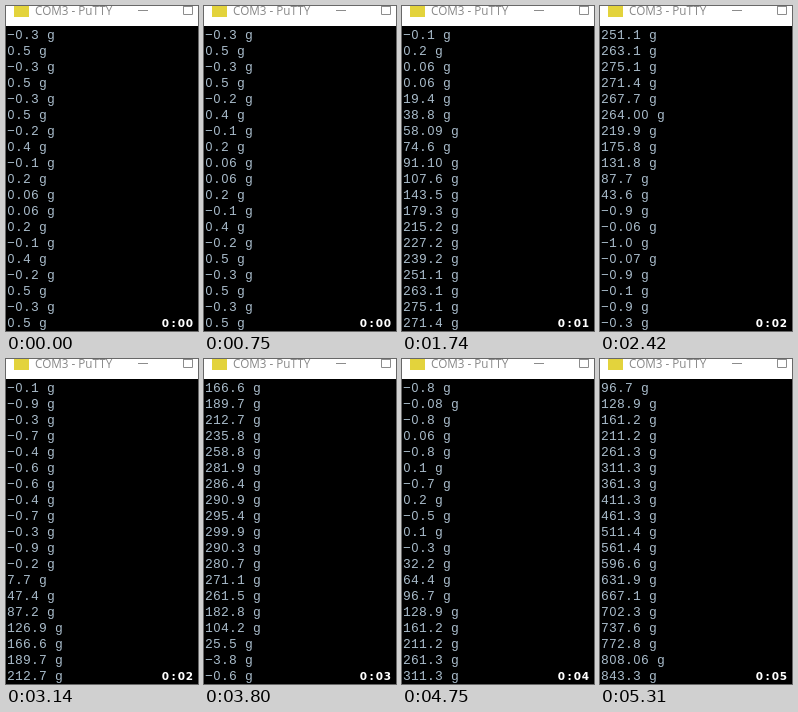
These frames come from a looping animation (192x325 px, 5410 ms). An HTML page:

```html
<!DOCTYPE html>
<html lang="en">
<head>
<meta charset="utf-8">
<title>Serial scale readout</title>
<style>
  html, body { margin: 0; width: 100%; height: 100%; overflow: hidden; background: #000; }
  svg { display: block; width: 192px; height: 325px; }
  .title { font: 11.7px "Open Sans", "Noto Sans", sans-serif; fill: #888; }
  .button { fill: none; stroke: #8c8c8c; }
  .cells { text-anchor: middle; }
  #rows { font: 13px "Liberation Mono", monospace; fill: #a9bccb; }
  #rows tspan { font: 12.3px "Liberation Sans", sans-serif; }
  #clock { font: bold 10.5px "DejaVu Sans", sans-serif; fill: #fff; }
</style>
</head>
<body>
<svg viewBox="0 0 192 325">
  <rect width="192" height="325"/>
  <rect width="192" height="20" fill="#fff"/>
  <rect x="8" y="-4" width="15" height="15" fill="#e3d33c"/>
  <text class="title" x="29" y="9">COM3 - PuTTY</text>
  <path class="button" d="M132 4.5h10M177.5 -1v9.5h9V-1M177.5 .5h9"/>
  <g id="rows" class="cells"></g>
  <text id="clock" class="cells" x="159.5 167.5 175.5 183.5" y="320.5">0:00</text>
</svg>
<script>
const LOOP = 5410, ROWS = 19, SECOND = 1048;

// Time in ms and rows scrolled by then
const scroll = [[0, 0], [750, 19], [1740, 42], [3140, 73], [3800, 89], [4750, 117], [5310, 130]];

// Row and load in grams: three presses, with rest between them
const load = [
  [0, 0.1], [45, 0.1], [48, 58.09], [51, 107.6], [54, 215.2], [59, 275.1], [62, 264], [68, -0.5],
  [84, -0.55], [85, 7.7], [89, 166.6], [94, 281.9], [98, 299.9], [102, 261.5], [105, 25.5],
  [106, -3.8], [107, -1], [117, -0.5], [127, -0.1], [132, 161.2], [140, 561.4], [148, 843.3],
];

function interpolate(points, x) {
  const next = points.findIndex(([px]) => px >= x);
  if (next < 0) return points[points.length - 1][1];
  if (next === 0) return points[0][1];
  const [x0, y0] = points[next - 1], [x1, y1] = points[next];
  return y0 + (y1 - y0) * (x - x0) / (x1 - x0);
}

// At rest the reading alternates with a slow beat
const hum = row => -0.45 * Math.cos(Math.PI * row) * Math.cos(Math.PI * (row - 2) / 17);

// Fractions below a tenth print with two decimals
function reading(row) {
  const level = interpolate(load, row);
  const grams = Math.abs(level) < 1.5 ? level + hum(row) : level;
  const digits = Math.abs(grams) % 1 < 0.1 ? 2 : 1;
  return grams.toFixed(digits).replace("-", "\u2212") + " g";
}

const cells = Array.from({ length: 10 }, (_, i) => 5 + 8 * i).join(" ");
const group = document.getElementById("rows");
const clock = document.getElementById("clock");
group.innerHTML = Array.from({ length: ROWS }, (_, i) =>
  `<text x="${cells}" y="${33 + 16 * i}"></text>`).join("");
const lines = [...group.children];

let shownRow = -1;
function draw(t) {
  clock.textContent = "0:0" + Math.floor(t / SECOND);
  const row = Math.floor(interpolate(scroll, t) + 0.05);
  if (row === shownRow) return;
  shownRow = row;
  lines.forEach((line, i) => {
    line.innerHTML = reading(row + i).replace(/0/g, "<tspan>0</tspan>");
  });
}

const start = performance.now();
function frame() {
  draw((performance.now() - start) % LOOP);
  requestAnimationFrame(frame);
}
frame();
</script>
</body>
</html>
```
